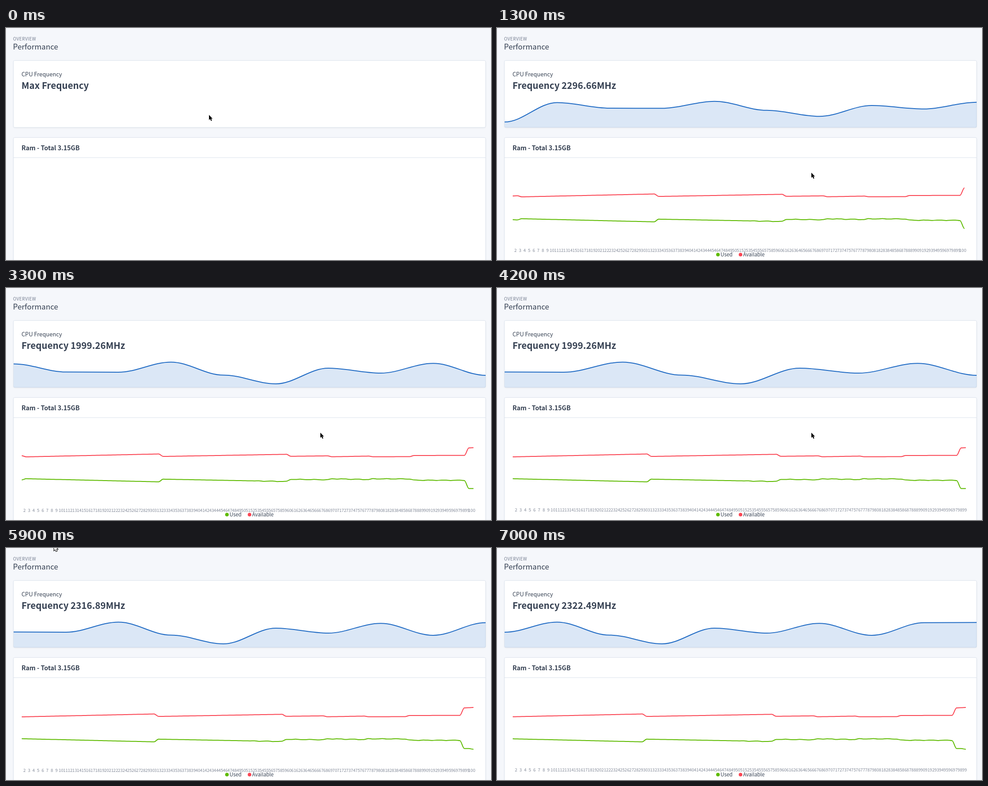
An HTML page for the animation above (7.1 s loop, 1080x518 px).

```html
<!DOCTYPE html>
<html lang="en">
<head>
<meta charset="utf-8">
<title>Performance</title>
<style>
html, body { margin: 0; width: 100%; height: 100%; overflow: hidden; background: #f5f7fb; }
svg { display: block; width: 1080px; height: 518px; fill: #354052;
  font-family: "Noto Sans CJK JP", "Noto Sans CJK SC", "Noto Sans CJK", sans-serif; }
.card { fill: #fff; stroke: #dbe2ec; filter: drop-shadow(0 1px 1px rgba(0, 0, 0, .05)); }
.pre { font-size: 9.8px; font-weight: 500; letter-spacing: .44px; fill: #737c8f; }
.title { font-size: 16.8px; }
.sub { font-size: 12.7px; }
.big { font-size: 20.25px; font-weight: 700; }
.head { font-size: 14.05px; font-weight: 700; }
.legend { font-size: 11.3px; }
.axis { font-size: 9.6px; fill: #868d9b; text-anchor: middle; }
.line { fill: none; stroke-width: 2; }
.tip { font-size: 9.5px; fill: #fff; }
.value { font-size: 9.2px; font-weight: 700; }
#cursor { paint-order: stroke; }
</style>
</head>
<body>
<svg viewBox="0 0 1080 518">
  <defs><clipPath id="inner"><rect x="17" y="73" width="1051" height="149" rx="2.5"/></clipPath></defs>
  <text class="pre" x="15.8" y="28">OVERVIEW</text>
  <text class="title" x="15.5" y="48">Performance</text>
  <rect class="card" x="16.5" y="72.5" width="1051.5" height="149.5" rx="3"/>
  <text class="sub" x="34.5" y="107.5">CPU Frequency</text>
  <text class="big" id="freq" x="34.5" y="136"></text>
  <g id="cpu" clip-path="url(#inner)"></g>
  <rect class="card" x="16.5" y="244.5" width="1051.5" height="300" rx="3"/>
  <path d="M17 289.5H1068" stroke="#dbe2ec"/>
  <text class="head" x="34.5" y="273">Ram - Total 3.15GB</text>
  <g id="ram"></g>
  <g id="tip"></g>
  <path id="cursor" d="M0 0V11.4L2.6 9 4.5 13.4 6.6 12.5 4.7 8.4H8Z"/>
</svg>
<script>
const LOOP = 7100, BLUE = '#206bc4', GREEN = '#5eba00', RED = '#fa4654';
const $ = id => document.getElementById(id);

// Each chart is a sliding window: a push adds a sample on the right, a pop drops one on the left
const cpuPush = [1300, 3300, 5200, 7000], cpuPop = [2100, 4200, 6200];
const ramPush = [600, 1300, 3300, 5200], ramPop = [2300, 4200, 6200];
const megahertz = [2296.66, 1999.26, 2316.89, 2322.49];
const cpuY = [232, 169.5, 187.5, 188, 165.5, 194.5, 214, 179, 190, 168.3, 195, 166.7, 166.3];

// Free memory drifts from one height to another, then jumps: [first sample, from, to]
const drifts = [[0, 375, 374.6], [2, 377, 370.6], [32, 376.1, 371.3], [60, 375.8, 374.8],
  [69, 376.8, 375.3], [78, 376.8, 376.5], [87, 374, 373.7], [99, 357, 356], [102]];

const passed = (times, t) => times.filter(s => s <= t).length;

function available(i) {
  const k = drifts.findIndex(d => d[0] > i) - 1;
  const [start, from, to] = drifts[k], end = drifts[k + 1][0] - 1;
  return from + (to - from) * (i - start) / (end - start);
}

// Used memory mirrors the free memory, with a slight wobble later on
const used = i => 428 + (375 - available(i)) * 1.1 + (i > 52 ? .6 * Math.sin(2 * i) : 0);

// Smooth path with level tangents at every sample
function curve(ys, x0, x1) {
  const step = (x1 - x0) / (ys.length - 1), h = step * .35;
  return ys.map((y, i) => {
    const x = x0 + i * step;
    return i ? `C${x - step + h} ${ys[i - 1]} ${x - h} ${y} ${x} ${y}` : `M${x} ${y}`;
  }).join('');
}

const line = (d, color) => `<path class="line" d="${d}" stroke="${color}"/>`;

function drawCpu(pushed, popped) {
  if (!pushed) return '';
  let ys = cpuY.slice(popped, 9 + pushed);
  if (!popped) ys = ys.map(y => 163.7 + (y - 165.5) * .694); // the low first sample widens the scale
  const d = curve(ys, 17, 1068);
  return `<path d="${d}V222H17Z" fill="${BLUE}" fill-opacity=".16"/>` + line(d, BLUE);
}

function drawRam(pushed, popped) {
  if (!pushed) return '';
  const n = 98 + pushed - popped, full = n === 100, end = full ? 1041 : 1044;
  const step = (end - 35) / (n - 1);
  const path = height => curve(Array.from({ length: n }, (_, i) => height(popped + i)), 35, end);
  let out = line(path(used), GREEN) + line(path(available), RED);
  for (let i = 1; i < n; i++)
    out += `<text class="axis" x="${35 + i * step - (full ? 4 : 3)}" y="${full ? 500 : 499.3}">${i + 1}</text>`;
  const key = (x, color, name) => `<circle cx="${x}" cy="506" r="4" fill="${color}"/>
    <text class="legend" x="${x + 5.8}" y="510">${name}</text>`;
  return out + key(492, GREEN, 'Used') + key(542.3, RED, 'Available');
}

function drawTip(x, opacity) {
  return x && `<path d="M410.5 159V222" stroke="#b6b6b6" stroke-dasharray="3"/>
    <circle cx="410.8" cy="194.8" r="3.8" fill="${BLUE}" stroke="#fff"/>
    <g class="tip" transform="translate(${x} 181.5)" opacity="${opacity}">
      <rect width="187" height="40.5" rx="3" fill="#354052"/>
      <text x="5" y="14.5">3</text>
      <circle cx="12.5" cy="30.5" r="5.5" fill="${BLUE}"/>
      <text x="26" y="34">Frequency:</text>
      <text class="value" x="82.5" y="34">2002.3865000000001</text>
    </g>`;
}

function tipAt(t) {
  if (t < 4700 || t >= 5200) return [''];
  return t < 5000 ? [350, .83] : [419, 1];
}

// The pointer jumps between rests, except for one glide in four decelerating steps
function pointerAt(t) {
  if (t < 100) return [452, 194];
  if (t < 600) return [503, 215];
  if (t < 4700) {
    const p = Math.min(4, Math.max(0, Math.floor(t / 100) - 7)) / 4, ease = 1 - (1 - p) ** 2;
    return [608 + 92 * ease, 296 + 27 * ease];
  }
  if (t < 5200) return [403, 162.5];
  if (t < 5900) return [241, 66];
  return t < 6200 ? [107, -6] : [-50, -50];
}

const shown = {};
function update(id, draw, args) {
  const state = args.join();
  if (shown[id] === state) return;
  shown[id] = state;
  $(id).innerHTML = draw(...args);
}

function render(t) {
  const pushed = passed(cpuPush, t);
  update('freq', n => n ? `Frequency ${megahertz[n - 1]}MHz` : 'Max Frequency', [pushed]);
  update('cpu', drawCpu, [pushed, passed(cpuPop, t)]);
  update('ram', drawRam, [passed(ramPush, t), passed(ramPop, t)]);
  update('tip', drawTip, tipAt(t));
  const [x, y] = pointerAt(t), hollow = y < 0, cursor = $('cursor');
  cursor.setAttribute('transform', `translate(${x} ${y})`);
  cursor.setAttribute('fill', hollow ? '#fff' : '#000');
  cursor.setAttribute('stroke', hollow ? '#000' : '#fff');
  cursor.setAttribute('stroke-width', hollow ? 2 : 1);
}

const start = performance.now();
function frame() {
  render((performance.now() - start) % LOOP);
  requestAnimationFrame(frame);
}
frame();
</script>
</body>
</html>
```
